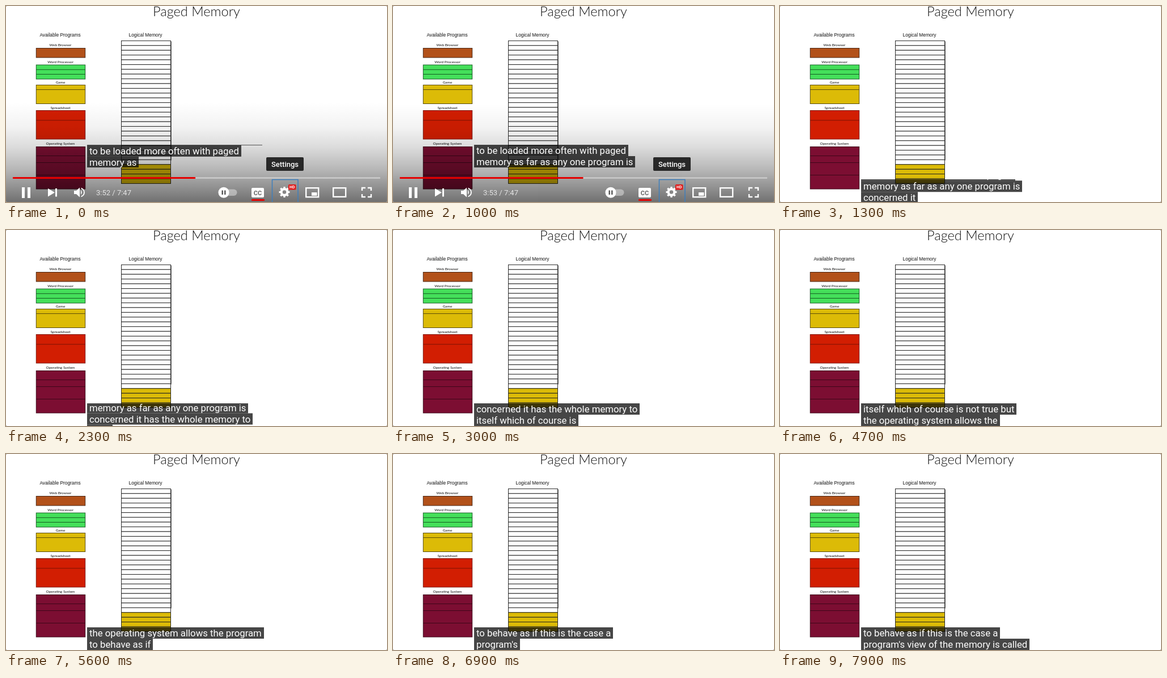
Animation of 672x346 px, one loop 8 s. Source, as an HTML page:

```html
<!DOCTYPE html>
<html lang="en">
<head>
<meta charset="utf-8">
<title>Paged Memory</title>
<style>
  html, body { margin: 0; width: 100%; height: 100%; overflow: hidden; background: #888; }
  #stage { position: absolute; left: 0; top: 0; width: 672px; height: 346px; overflow: hidden; background: #fff; border-radius: 2px; }
  svg { position: absolute; left: 0; top: 0; }
  .label { font: 6.5px Lato, sans-serif; text-anchor: middle; fill: #111; }
  .heading { font: 8.35px "Liberation Sans", Arial, sans-serif; text-anchor: middle; fill: #111; }
  .title { font: 300 23.6px Lato, sans-serif; text-anchor: middle; fill: #111; }
  .ui { font-family: Roboto, sans-serif; }
  #caption { position: absolute; left: 143px; width: 520px; height: 40px; overflow: hidden; }
  #lines { position: absolute; left: 0; top: 0; }
  #lines div { height: 20px; }
  #lines span { display: inline-block; height: 20px; padding: 0 4px; background: rgba(8, 8, 8, .75);
    color: #fff; font: 16.75px/20px Roboto, sans-serif; white-space: pre; }
  #lines span:empty { display: none; }
</style>
</head>
<body>
<div id="stage">
  <svg width="672" height="346">
    <text class="title" x="336" y="18.3">Paged Memory</text>
    <text class="heading" x="95.5" y="54">Available Programs</text>
    <text class="heading" x="246" y="54">Logical Memory</text>
    <g id="programs"></g>
    <g id="memory"></g>
  </svg>

  <svg id="shade" width="672" height="346">
    <defs>
      <linearGradient id="dim" x1="0" y1="0" x2="0" y2="1">
        <stop offset="0" stop-opacity="0"/>
        <stop offset=".25" stop-opacity=".05"/>
        <stop offset=".45" stop-opacity=".14"/>
        <stop offset=".68" stop-opacity=".29"/>
        <stop offset=".85" stop-opacity=".43"/>
        <stop offset="1" stop-opacity=".56"/>
      </linearGradient>
    </defs>
    <rect y="170" width="672" height="176" fill="url(#dim)"/>
  </svg>

  <div id="caption"><div id="lines"></div></div>

  <svg id="controls" class="ui" width="672" height="346" fill="#fff">
    <rect x="12" y="302" width="648" height="3" fill-opacity=".35"/>
    <rect id="played" x="12" y="302" width="322" height="3" fill="#e60000"/>
    <!-- pause, next, volume -->
    <path d="M28 320h5v19h-5zM38 320h5v19h-5z"/>
    <path d="M74 322l12 7.200-12 7.200zM87 322h3v14.400h-3z"/>
    <path d="M120 326h4l6-5.500v17l-6-5.500h-4z"/>
    <path d="M132 325q3.500 4 0 8z"/>
    <path d="M132.500 321.500q5.500 2.500 5.500 7.500t-5.500 7.500" fill="none" stroke="#fff" stroke-width="1.800"/>
    <text id="clock" x="159" y="333.500" font-size="13" fill="#e4e4e4"></text>
    <!-- autoplay switch -->
    <rect x="378" y="323.500" width="29.500" height="11.500" rx="5.750" fill-opacity=".4"/>
    <circle cx="384" cy="329.300" r="9.500"/>
    <path d="M380.500 325.500h2.400v7.600h-2.400zM385.100 325.500h2.400v7.600h-2.400z" fill="#555"/>
    <!-- subtitles -->
    <rect x="433" y="321" width="22" height="17" rx="2"/>
    <text x="444" y="333.500" font-size="11" font-weight="700" text-anchor="middle" fill="#666">CC</text>
    <rect x="433" y="341" width="23" height="3" rx="1" fill="#e60000"/>
    <!-- settings -->
    <path d="M469.500 347v-40.500h45.500V347" fill="none" stroke="#3f7fbd" stroke-width="1.500"/>
    <g fill="none" stroke="#fff">
      <circle cx="491" cy="328.500" r="5.400" stroke-width="4.200"/>
      <circle cx="491" cy="328.500" r="8" stroke-width="3" pathLength="16" stroke-dasharray="1 1" stroke-dashoffset=".5"/>
    </g>
    <rect x="498" y="315" width="13.500" height="9.500" rx="1.500" fill="#e01b1b"/>
    <text x="504.800" y="322.300" font-size="7" font-weight="700" text-anchor="middle">HD</text>
    <rect x="459" y="267" width="66" height="24" rx="2" fill="#1c1c1c" fill-opacity=".93"/>
    <text x="492" y="283.500" font-size="13" font-weight="500" text-anchor="middle">Settings</text>
    <!-- mini player, wide view, full screen -->
    <g fill="none" stroke="#fff" stroke-width="2.400">
      <rect x="529.200" y="321.200" width="22" height="16"/>
      <rect x="577.200" y="321.200" width="22" height="15.600"/>
      <path d="M628 326v-5h6M638 321h6v5M644 332v5h-6M634 337h-6v-5"/>
    </g>
    <rect x="539" y="329" width="9.500" height="6"/>
  </svg>
</div>

<script>
const LOOP = 8000, ROW = 20, SCROLL = 433;
const $ = id => document.getElementById(id);

function add(parent, name, attrs, text) {
  const node = document.createElementNS('http://www.w3.org/2000/svg', name);
  for (const key in attrs) node.setAttribute(key, attrs[key]);
  if (text) node.textContent = text;
  parent.append(node);
}

// name, label baseline, top, bottom, fill, line colour, page breaks
const programs = [
  ['Web Browser', 71.3, 74.5, 91, '#b2511a', '#4a2410', []],
  ['Word Processor', 101, 104, 129, '#44df5a', '#145c22', [112.3, 120.5]],
  ['Game', 136.8, 139.5, 172.5, '#dcbb07', '#5a4c08', [147.6]],
  ['Spreadsheet', 182, 184.5, 235, '#d21e02', '#7c1204', [201.8]],
  ['Operating System', 245.3, 248.5, 323, '#7c0e32', '#3c0618', [264.5, 276.5, 298.5]]
];
for (const [name, base, top, bottom, fill, stroke, breaks] of programs) {
  add($('programs'), 'text', { class: 'label', x: 96, y: base }, name);
  add($('programs'), 'rect', { x: 53.3, y: top, width: 86.4, height: bottom - top, fill, stroke });
  for (const y of breaks) add($('programs'), 'path', { d: `M53 ${y}h87`, stroke });
}

const PAGES = 30, PAGE = 8.4;
add($('memory'), 'path', { d: 'M291.3 62.500v210', stroke: '#777', 'stroke-width': 1.4 });
for (let i = 0; i < PAGES; i++) {
  add($('memory'), 'rect', {
    x: 203.5, y: 61.4 + i * PAGE, width: 87, height: PAGE,
    fill: i < 26 ? '#fff' : '#dcbb07', stroke: '#222', 'stroke-width': .95
  });
}

// Spoken words by time; a leading slash rolls the captions up to a new line.
const cues = [
  [-9000, '/this means that pages of programs need'],
  [-9000, '/to be loaded more often with paged'],
  [-320, '/memory as'], [200, ' far'], [400, ' as any'], [600, ' one program'], [900, ' is'],
  [1040, '/concerned'], [1200, ' it'], [1900, ' has the whole memory'], [2100, ' to'],
  [2250, '/itself'], [2500, ' which'], [2800, ' of course'], [3000, ' is'],
  [3300, ' not true'], [3500, ' but'],
  [3850, '/the'], [4100, ' operating'], [4400, ' system'], [4600, ' allows'], [4700, ' the'],
  [4900, ' program'],
  [5150, '/to behave'], [5500, ' as'], [5600, ' if'], [5800, ' this'], [5900, ' is'],
  [6000, ' the'], [6100, ' case'], [6200, ' a'],
  [6420, "/program's"], [7300, ' view'], [7400, ' of'], [7500, ' the'], [7600, ' memory'],
  [7700, ' is'], [7800, ' called']
];
const spans = cues.filter(cue => cue[1][0] === '/').map(() => {
  const row = document.createElement('div'), span = document.createElement('span');
  row.append(span);
  $('lines').append(row);
  return span;
});

const clamp = v => Math.min(1, Math.max(0, v));
const bezier = (s, a, b) => 3 * a * s * (1 - s) ** 2 + 3 * b * s * s * (1 - s) + s ** 3;
function ease(p) {
  let lo = 0, hi = 1;
  for (let i = 0; i < 14; i++) {
    const mid = (lo + hi) / 2;
    if (bezier(mid, .25, .25) < p) lo = mid; else hi = mid;
  }
  return bezier(hi, .1, 1);
}

function drawCaption(t) {
  const texts = spans.map(() => '');
  let line = -1, rolled = 0;
  for (const [at, words] of cues) {
    if (at > t) break;
    const fresh = words[0] === '/';
    if (fresh) {
      line++;
      rolled += ease(clamp((t - at) / SCROLL));
    }
    texts[line] += fresh ? words.slice(1) : words;
  }
  spans.forEach((span, i) => {
    if (span.textContent !== texts[i]) span.textContent = texts[i];
  });
  $('lines').style.transform = `translateY(${(2 - rolled) * ROW}px)`;
  $('caption').style.top = 244.5 + 61 * ease(clamp((t - 1000) / 100)) + 'px';
}

function drawControls(t) {
  const seconds = 232.1 + t / 1000, whole = Math.floor(seconds);
  $('played').setAttribute('width', 648 * seconds / 467);
  $('clock').textContent = `${Math.floor(whole / 60)}:${String(whole % 60).padStart(2, '0')} / 7:47`;
  const opacity = 1 - clamp((t - 1000) / 250);
  $('shade').style.opacity = $('controls').style.opacity = opacity;
}

function frame() {
  const t = performance.now() % LOOP;
  drawCaption(t);
  drawControls(t);
  requestAnimationFrame(frame);
}
frame();
</script>
</body>
</html>
```
